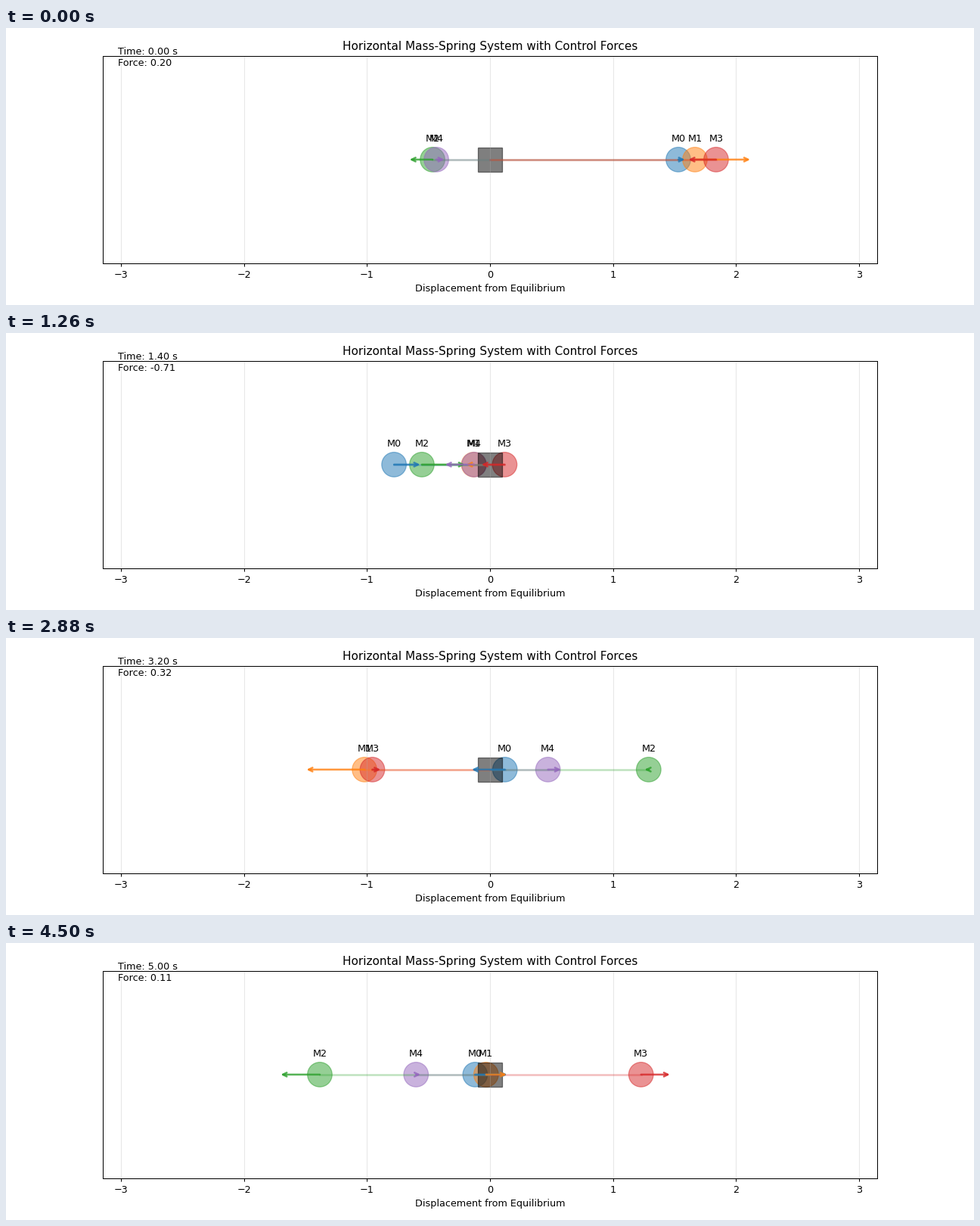
A matplotlib script that plays this animation: 1280x366 px, repeating every 4.59 s.

```python
import numpy as np
import matplotlib.pyplot as plt
from matplotlib.animation import FuncAnimation
from matplotlib.patches import Circle, FancyArrowPatch, Rectangle

plt.rcParams["font.family"] = "DejaVu Sans"

WIDTH, HEIGHT, DPI = 14, 4.0032, 91.4286  # 1280 x 366 pixels
STIFFNESS, DAMPING = 2.0, 0.5
DT, FRAMES, INTERVAL = 0.1, 51, 90
RADIUS = 0.1
FORCE_SCALE = 1 / 3
HALF_WIDTH = 3.146

# force amplitude, force rate, force phase, start position, start velocity
MASSES = [
    (0.82, 1.470, -1.3745, 1.530, -1.94),
    (1.455, 0.935, 0.390, 1.665, -0.80),
    (1.16, 1.165, -2.074, -0.467, -1.513),
    (0.705, 0.675, 2.838, 1.837, 1.64),
    (1.27, 1.933, 1.4162, -0.436, 0.574),
]


def force(mass, t):
    amp, rate, phase = mass[:3]
    return amp * np.cos(rate * t + phase)


def position(mass, t):
    """Driven, damped oscillator of unit mass: steady part plus transient."""
    amp, rate, phase, x0, v0 = mass
    drive = amp * np.exp(1j * phase) / (STIFFNESS - rate**2 + 1j * DAMPING * rate)
    decay = DAMPING / 2
    omega = np.sqrt(STIFFNESS - decay**2)
    a = x0 - drive.real
    b = (v0 - (1j * rate * drive).real + decay * a) / omega
    transient = np.exp(-decay * t) * (a * np.cos(omega * t) + b * np.sin(omega * t))
    return (drive * np.exp(1j * rate * t)).real + transient


fig = plt.figure(figsize=(WIDTH, HEIGHT), dpi=DPI)
ax = fig.add_axes([0.1, 0.15, 0.8, 0.75])
half_height = HALF_WIDTH * (0.75 * HEIGHT) / (0.8 * WIDTH)
ax.set_xlim(-HALF_WIDTH, HALF_WIDTH)
ax.set_ylim(-half_height, half_height)
ax.set_xticks(range(-3, 4))
ax.set_yticks([])
ax.grid(True, alpha=0.3)
ax.set_xlabel("Displacement from Equilibrium")
ax.set_title("Horizontal Mass-Spring System with Control Forces")

discs, springs, arrows, labels = [], [], [], []
for i in range(len(MASSES)):
    color = f"C{i}"
    discs.append(ax.add_patch(Circle((0, 0), RADIUS, color=color, alpha=0.5)))
    springs.append(ax.plot([], [], color=color, lw=2, alpha=0.3)[0])
    arrows.append(ax.add_patch(FancyArrowPatch(
        (0, 0), (1, 0), arrowstyle="->", mutation_scale=10, color=color,
        lw=2, alpha=0.8, shrinkA=0, shrinkB=0, zorder=3)))
    labels.append(ax.text(0, 0.145, f"M{i}", ha="center"))
ax.add_patch(Rectangle((-RADIUS, -RADIUS), 2 * RADIUS, 2 * RADIUS,
                       color="black", alpha=0.5))
readout = ax.text(0.02, 0.95, "", transform=ax.transAxes)


def update(frame):
    t = frame * DT
    for mass, disc, spring, arrow, label in zip(MASSES, discs, springs, arrows, labels):
        x, f = position(mass, t), force(mass, t)
        disc.center = (x, 0)
        spring.set_data([0, x], [0, 0])
        arrow.set_positions((x, 0), (x + FORCE_SCALE * f, 0))
        label.set_x(x)
    readout.set_text(f"Time: {t:.2f} s\nForce: {force(MASSES[-1], t):.2f}")
    return [*discs, *springs, *arrows, *labels, readout]


anim = FuncAnimation(fig, update, frames=FRAMES, interval=INTERVAL,
                     repeat=True, repeat_delay=0)
plt.show()
```
